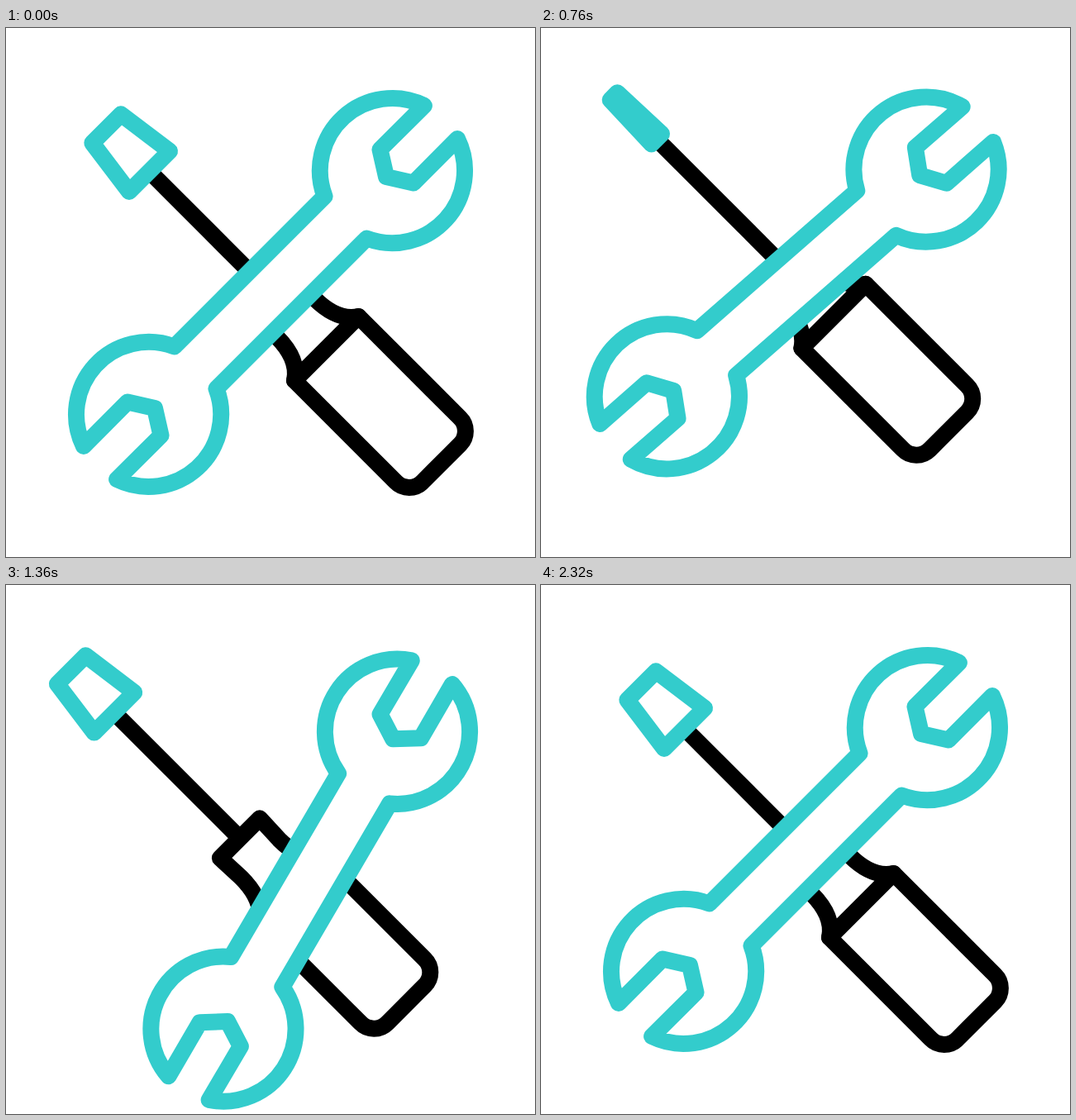
Animation of 640 by 640 pixels, one loop 2.4 s. Source, as an HTML page:

```html
<!DOCTYPE html>
<html lang="en">
<head>
<meta charset="utf-8">
<title>Wrench and screwdriver</title>
<style>
  html, body { margin: 0; width: 100%; height: 100%; overflow: hidden; background: #fff; }
  svg { display: block; width: 100%; height: 100%; }
  path { fill: #fff; stroke: #000; stroke-width: 20; stroke-linejoin: round; }
  .teal { stroke: #33cccc; }
</style>
</head>
<body>
<svg viewBox="0 0 640 640">
  <g id="driver">
    <path d="M173.5 173.5L325.5 325.5"/>
    <path d="M349 426.5C353 408 344 390 327 373L301.5 349.5L349.5 301.5L373 327C390 344 408 353 426.5 349Z"/>
    <path d="M426.5 349L549 471.5A22.6 22.6 0 0 1 549 504L504 549A22.6 22.6 0 0 1 471.5 549L349 426.5Z"/>
    <path id="blade" class="teal"/>
  </g>
  <path id="wrench" class="teal"/>
</svg>
<script>
  const LOOP = 2400;
  const SIZE = 640;
  const [driver, blade, wrench] = ['driver', 'blade', 'wrench'].map(id => document.getElementById(id));

  const clamp = (v, lo, hi) => Math.min(hi, Math.max(lo, v));
  const ease = u => u * u * (3 - 2 * u);

  // One wrench head; the other is the same head turned by half a circle
  function wrenchPath() {
    const arc = 'A87.6 87.6 0 0 1 ';
    const flip = ([x, y]) => [SIZE - x, SIZE - y];
    const mirror = ([x, y]) => [SIZE - y, SIZE - x];
    const neck = [385.5, 203.6], tip = [505.9, 93.9], jaw = [452.5, 147], nut = [460, 180];
    const head = f => f(neck) + arc + f(tip) + 'L' + f(jaw) + 'L' + f(nut) +
      'L' + f(mirror(jaw)) + 'L' + f(mirror(tip)) + arc + f(mirror(neck));
    return 'M' + head(p => p) + 'L' + head(flip) + 'Z';
  }

  // The wrench swings in even beats and takes a little longer to settle
  const TURNS = [0, -15, 15, -15, 10.6, 0];
  function swing(t) {
    const lead = 119, beat = 405, settle = 470;
    const n = clamp(Math.floor((t - lead) / beat), 0, 4);
    const u = clamp((t - lead - n * beat) / (n < 4 ? beat : settle), 0, 1);
    return TURNS[n] + (TURNS[n + 1] - TURNS[n]) * ease(u);
  }

  // The flat blade turns four times, from wide to edge-on and back
  function spin(t) {
    const turn = 428, end = 1775;
    const phase = clamp((t - end) / turn, -4, 0);
    return .555 + .445 * Math.cos(2 * Math.PI * phase);
  }

  // Points [time, x, y] of the drift, joined by a smooth curve that rests at both ends
  const DRIFT = [[0, 0, 0], [560, -27.5, -35], [980, -38.5, -39], [1140, -40.5, -33.5],
                 [1560, -41.5, -7], [1880, -23, 3], [2200, 0, 0]];
  function drift(t, axis) {
    const last = DRIFT.length - 1;
    if (t >= DRIFT[last][0]) return 0;
    const i = DRIFT.findIndex(p => p[0] > t) - 1;
    const slope = n => {
      if (n === 0 || n === last) return 0;
      const p = DRIFT[n - 1], q = DRIFT[n + 1];
      return (q[axis] - p[axis]) / (q[0] - p[0]);
    };
    const a = DRIFT[i], b = DRIFT[i + 1];
    const d = b[0] - a[0], u = (t - a[0]) / d, v = 1 - u;
    return a[axis] + (b[axis] - a[axis]) * ease(u) + d * u * v * (slope(i) * v - slope(i + 1) * u);
  }

  function bladePath(s) {
    const end = 121.75, base = 173.5, n = 17.4 * s, w = 24.5 * s;
    return `M${end + n} ${end - n}L${base + w} ${base - w}L${base - w} ${base + w}L${end - n} ${end + n}Z`;
  }

  function draw(t) {
    wrench.setAttribute('transform', `rotate(${swing(t)} 488.6 151.4)`);
    driver.setAttribute('transform', `translate(${drift(t, 1)} ${drift(t, 2)})`);
    blade.setAttribute('d', bladePath(spin(t)));
  }

  wrench.setAttribute('d', wrenchPath());
  const start = performance.now();
  function tick() {
    draw((performance.now() - start) % LOOP);
    requestAnimationFrame(tick);
  }
  tick();
</script>
</body>
</html>
```
